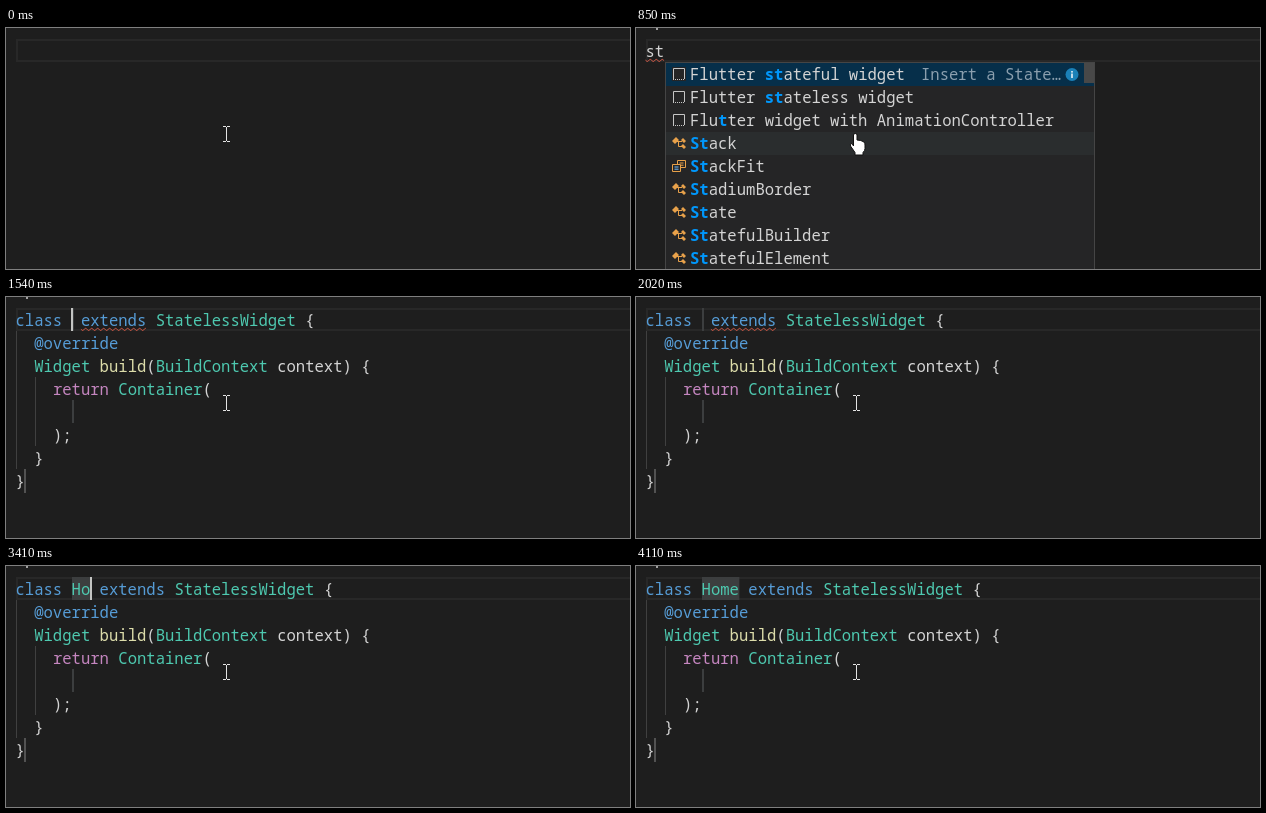
An HTML page with a canvas for the animation above (4.2 s loop, 624 by 241 pixels).

```html
<!DOCTYPE html>
<html lang="en">
<head>
<meta charset="utf-8">
<title>Snippet completion</title>
<style>
  html, body { margin: 0; width: 100%; height: 100%; overflow: hidden; background: #1e1e1e; }
  canvas { display: block; }
</style>
</head>
<body>
<canvas id="stage" width="624" height="241"></canvas>
<script>
const ctx = document.getElementById('stage').getContext('2d');
const LOOP = 4200, LEFT = 9.5, CHAR = 9.346, LINE = 23, TOP = 11;
const FONT = '15.577px "Noto Sans Mono", "DejaVu Sans Mono", monospace';
const BLUE = '#569cd6', TEAL = '#4ec9b0', YELLOW = '#dcdcaa', PINK = '#c586c0', PLAIN = '#d4d4d4';
const MATCH = '#0097fb', ORANGE = '#e8a14a', GREY = '#c5c5c5', PANEL = '#252526';

// Each code line: indent column, then colour/text pairs.
const body = [
  [2, BLUE, '@override'],
  [2, TEAL, 'Widget ', YELLOW, 'build', PLAIN, '(', TEAL, 'BuildContext', PLAIN, ' context) {'],
  [4, PINK, 'return ', TEAL, 'Container', PLAIN, '('],
  [6],
  [4, PLAIN, ');'],
  [2, PLAIN, '}'],
  [0, PLAIN, '}']
];

// Asterisks enclose the matched letters.
const items = [
  ['snippet', 'Flutter *st*ateful widget', 'Insert a State…'],
  ['snippet', 'Flutter *st*ateless widget', 'Insert a Stat…'],
  ['snippet', 'Flu*t*ter widget with AnimationController'],
  ['class', '*St*ack'],
  ['enum', '*St*ackFit'],
  ['class', '*St*adiumBorder'],
  ['class', '*St*ate'],
  ['class', '*St*atefulBuilder'],
  ['class', '*St*atefulElement']
];

const colX = col => LEFT + col * CHAR;
const lineY = n => TOP + n * LINE;
const baseline = n => lineY(n) + 18;
const between = (t, a, b) => t >= a && t < b;

function rect(x, y, w, h, color) {
  ctx.fillStyle = color;
  ctx.fillRect(x, y, w, h);
}

function text(str, x, y, color, bold) {
  ctx.font = (bold ? 'bold ' : '500 ') + FONT;
  ctx.fillStyle = color;
  ctx.fillText(str, x, y);
  return x + str.length * CHAR;
}

function shape(d, x, y, fill, stroke, width = 1) {
  const path = new Path2D(d);
  ctx.save();
  ctx.translate(x, y);
  if (fill) { ctx.fillStyle = fill; ctx.fill(path); }
  if (stroke) { ctx.strokeStyle = stroke; ctx.lineWidth = width; ctx.stroke(path); }
  ctx.restore();
}

function codeLine(n, [indent, ...tokens]) {
  let x = colX(indent);
  for (let i = 0; i < tokens.length; i += 2)
    x = text(tokens[i + 1], x, baseline(n), tokens[i]);
}

function squiggle(from, to) {
  const x0 = colX(from), width = colX(to) - x0;
  ctx.beginPath();
  for (let dx = 0; dx <= width; dx += 0.5) {
    const fromTrough = Math.abs((dx + 1.25) % 6 - 3);
    ctx.lineTo(x0 + dx, 33.6 - fromTrough * 0.8);
  }
  ctx.strokeStyle = '#e5604c';
  ctx.lineWidth = 1;
  ctx.stroke();
}

function caret(col) {
  rect(Math.floor(colX(col)), TOP, 2, LINE, '#c3c4c2');
}

const icons = {
  snippet(x, y) {
    rect(x, y - 1, 14, 14, PANEL);
    shape('M1.5 11V.5H12.5V11', x, y, null, GREY);
    for (let i = 0; i < 6; i++) rect(x + 1 + i * 2, y + 11, 1, 1, GREY);
  },
  class(x, y) {
    shape('M0 4L4 0L7 3L3 7Z M9 3L11 1L14 4L12 6Z M9 9L11 7L14 10L12 12Z', x, y, ORANGE);
    shape('M5 4.5H10M6.5 4.5V9.5H10', x, y, null, ORANGE);
  },
  enum(x, y) {
    shape('M5.5 4V.5H13.5V7.5H9M7.5 3H11.5M9 5.2H11.5', x, y, null, ORANGE);
    shape('M.5 4.5H8.5V11.5H.5Z', x, y, null, ORANGE);
    shape('M2.5 7H6.5M2.5 9.2H6.5', x, y, null, '#75beff');
  }
};

function infoIcon(x, y) {
  ctx.beginPath();
  ctx.arc(x, y, 6.5, 0, 7);
  ctx.fillStyle = '#1b81b8';
  ctx.fill();
  rect(x - 0.8, y - 3.5, 1.6, 1.6, '#e8f2f8');
  rect(x - 0.8, y - 1, 1.6, 4.5, '#e8f2f8');
}

function popup(selected, settled) {
  rect(29, 34, 430, 210, '#454545');
  rect(30, 35, 428, 210, PANEL);
  items.forEach(([icon, label, detail], i) => {
    const y = 35 + i * LINE;
    if (i === selected) rect(30, y, 428, LINE, '#062f4a');
    else if (i === 3 && settled) rect(30, y, 428, LINE, '#2a2d2e');
    icons[icon](36, y + 5);
    let x = 54;
    label.split('*').forEach((part, k) => {
      x = text(part, x, y + 17, k % 2 ? MATCH : PLAIN, k % 2);
    });
    if (i === selected) {
      text(detail, x + 16, y + 17, '#8b9fae');
      infoIcon(436, y + 11.5);
    }
  });
  if (settled) rect(448, 35, 10, 20, '#484848');
}

function pointer(hand) {
  if (hand)
    shape('M3.5 13.5V2.5Q3.5 1 5.2 1Q7 1 7 2.5V7.5Q11 7.5 14 9.5Q15 10.5 15 12.5V16Q15 18 13 20V22.5H5V20L.5 13.5Q-.5 11 2 11Z',
      214, 104.5, '#fff', '#111');
  else
    shape('M0 .5H3M4 .5H7M3.5 1V15M0 15.5H3M4 15.5H7', 217, 98, null, '#e4e4e4');
}

function typing(t) {
  if (t < 70) return;
  const open = t >= 300;
  text(open ? 'st' : 's', LEFT, baseline(0), PLAIN);
  if (t >= 150) squiggle(0, t < 390 ? 1 : 2);
  if (open) popup(t < 1250 ? 0 : 1, t >= 390);
  if (!between(t, 850, 1310)) caret(open ? 2 : 1);
}

function snippet(t) {
  const name = 'Home'.slice(0, [3180, 3410, 3560, 3640].filter(at => t >= at).length);
  const end = 6 + name.length;
  rect(66, TOP, Math.max(2, name.length * CHAR), LINE, '#3c3e3f');
  rect(10, lineY(1), 1, LINE * 6, '#404040');
  rect(29, lineY(3), 1, LINE * 3, '#404040');
  rect(66, lineY(4), 2, LINE, '#3c3e3f');
  rect(18, lineY(7), 2, LINE + 1, '#525252');

  codeLine(0, [0, BLUE, 'class ', TEAL, name, BLUE, ' extends ', TEAL, 'StatelessWidget', PLAIN, ' {']);
  body.forEach((line, i) => codeLine(i + 1, line));
  if (!name) squiggle(7, 14);
  if (!between(t, 2020, 2560) && !between(t, 3010, 3180) && t < 4110) caret(end);
}

function draw(now) {
  const t = now % LOOP;
  rect(0, 0, 624, 241, '#1e1e1e');
  ctx.strokeStyle = '#282828';
  ctx.lineWidth = 2;
  ctx.strokeRect(11, 12, 640, 21);
  const speckOn = between(t, 620, 1770) || between(t, 3410, 3870) || t >= 3960;
  if (speckOn) rect(20, 0, 2, 2, '#a0a0a0');
  (t < 1540 ? typing : snippet)(t);
  pointer(between(t, 300, 1540));
}

const start = performance.now();
function frame() {
  draw(performance.now() - start);
  requestAnimationFrame(frame);
}
frame();
</script>
</body>
</html>
```
